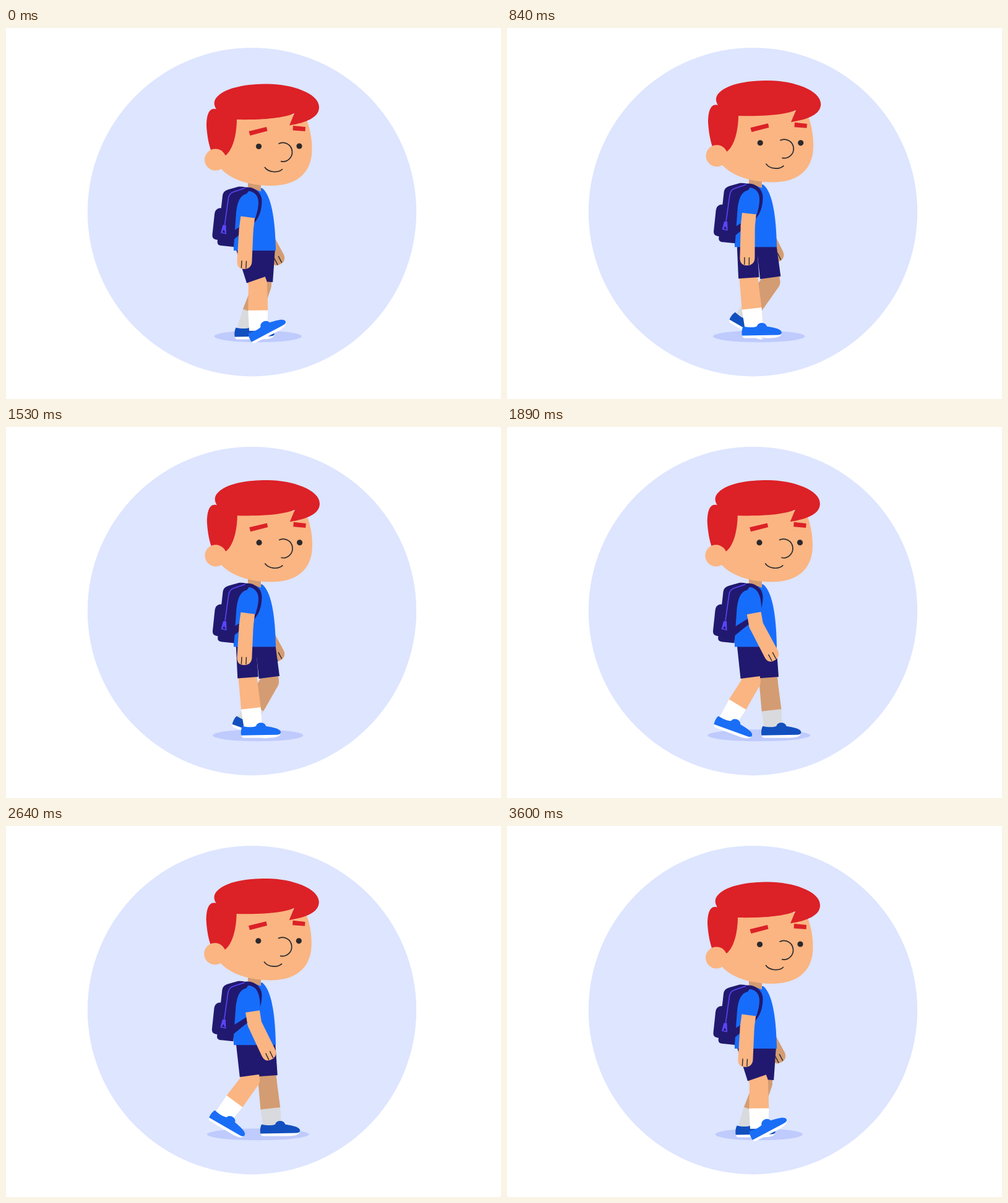
An HTML page for the animation above (3.63 s loop, 800 by 600 pixels).

```html
<!DOCTYPE html>
<html lang="en">
<head>
<meta charset="utf-8">
<title>Walking boy</title>
<style>
html, body { margin: 0; width: 100%; height: 100%; overflow: hidden; background: #fff; }
svg { display: block; width: 800px; height: 600px; }
</style>
</head>
<body>
<svg id="stage" viewBox="0 0 800 600" xmlns="http://www.w3.org/2000/svg"></svg>
<script>
const SKIN = '#fab582', SHADE = '#d49c72', HAIR = '#dc2127', SHIRT = '#176dfb';
const NAVY = '#21196f', ZIP = '#5b46fb', INK = '#2b292d';
const LOOP = 3630, STEP = 30, CYCLE = 720;
const THIGH = 62, SHIN = 73, UPPER = 47;

const leg = (id, skin, sock, shoe, cuff) => `
  <g id="${id}">
    <rect x="-15" y="20" width="30" height="43" fill="${skin}"/>
    <g id="${id}Shin">
      <circle r="15" fill="${skin}"/>
      <path d="M-15 0H15L16 ${cuff + 1}H-16Z" fill="${skin}"/>
      <path d="M-16 ${cuff}H16L14.500 76H-14.500Z" fill="${sock}"/>
      <g id="${id}Foot">
        <path d="M-19 11L45 9C45 17 35 18 20 18H-14C-18 18-19 16-19 11Z" fill="#fff"/>
        <path d="M-17-1C-8 1 0 1 5-1C6-8 19-9 21-1C32 1 45 3 45 9C45 12 42 13 37 13L-19 14C-20 8-19 2-17-1Z" fill="${shoe}"/>
      </g>
    </g>
    <path d="M-15-5H17V55H-16.500Z" fill="${NAVY}"/>
  </g>`;

const arm = (id, skin, sleeve) => `
  <g id="${id}">
    <rect x="-11.500" y="15" width="23" height="32" fill="${skin}"/>
    <g id="${id}Fore">
      <circle r="11.500" fill="${skin}"/>
      <path d="M-11.500 0L-12 52C-12 60-8 64-2 64C5 65 12 61 12 52L11.500 0Z" fill="${skin}"/>
      <path d="M-4.500 51V63M3 51V63" stroke="${INK}" stroke-width="1.400"/>
    </g>
    <path d="M-12.500 27C-14 5-14-11 1-11C14-11 17 2 12.500 27Z" fill="${sleeve}"/>
  </g>`;

const head = `
  <g id="head">
    <path d="M340 140H482C491 158 494.500 178 494.500 196C494.500 236 468 255 428 255C395 255 363 246 346 226Z" fill="${SKIN}"/>
    <path d="M342 132C328 126 324 141 324 158C325 175 328 190 332 200L355 206C367 196 373 172 373 146Z" fill="${HAIR}"/>
    <path d="M341 133C336 126 334 118 342 110.500C357 95.500 390 90.500 423 90.500C460 90.500 506 105 506 128C506 145 485 153 458 157.500L466 138C452 144 426 149 372 148Z" fill="${HAIR}"/>
    <circle cx="338.500" cy="213" r="17.500" fill="${SKIN}"/>
    <path d="M392.500 167L421 160L422.500 166.500L394.500 174ZM464 158L484 160L483.500 167L463.500 165.500Z" fill="${HAIR}"/>
    <circle cx="408.500" cy="191.500" r="4.600" fill="${INK}"/>
    <circle cx="474" cy="191" r="4.600" fill="${INK}"/>
    <path d="M440.500 187.200A15.200 15.200 0 1 1 444 215.600M418 225C424 234 440 235 447 228"
      fill="none" stroke="${INK}" stroke-width="1.700"/>
  </g>`;

const pack = `
  <g id="pack">
    <path d="M350 271C351 265 354 263 360 261L376 256.500Q388 256 394 261L389 268C379 270 374 280 372 298L368 354L349 352C342 352 341 348 342 343Z" fill="${NAVY}"/>
    <path d="M350 291C341 291 338 294 337 301L333.500 334C333 340 336 342 343 343H350Z" fill="${NAVY}"/>
    <path d="M386 259L368 265Q361 267 359.500 275L353.500 318" fill="none" stroke="${ZIP}" stroke-width="1.600"/>
    <path d="M350.500 318.500H355.500L356 333.500L347 331.500Z" fill="${ZIP}"/>
    <path d="M352 326L354.500 331.500L349.500 330.500Z" fill="${NAVY}"/>
  </g>`;

const stage = document.getElementById('stage');
stage.innerHTML = `
  <circle cx="397.500" cy="297.700" r="265.700" fill="#dde5ff"/>
  <ellipse id="shadow" cx="407.200" cy="498.700" ry="9.500" fill="#bfcafd"/>
  <g id="body">
    ${arm('farArm', SHADE, SHIRT)}
    ${leg('farLeg', SHADE, '#d8dadd', '#1250bf', 46)}
    ${leg('nearLeg', SKIN, '#fff', '#1a6ef6', 43)}
    <path d="M373 350H431V372H375Z" fill="${NAVY}"/>
    <path d="M386 258L414 259C428 270 435 305 436 360H368C367 320 370 285 377 268Z" fill="${SHIRT}"/>
    <path d="M391 245H412V264.500L391 257Z" fill="${SHADE}"/>
    <path d="M384 261C400 258 411 268 410.500 281C410 300 402 314 388 322L366 336" fill="none" stroke="${NAVY}" stroke-width="6"/>
    <path d="M366 329L390 314V324L368 342Z" fill="${NAVY}"/>
    ${pack}
    ${arm('nearArm', SKIN, SHIRT)}
    ${head}
  </g>`;

const part = {};
stage.querySelectorAll('[id]').forEach(e => part[e.id] = e);

// Smooth periodic curve through [time, value] keys, without overshoot.
function curve(keys, period) {
  const n = keys.length;
  const at = i => {
    const k = keys[(i + n) % n];
    return [k[0] + Math.floor(i / n) * period, k[1]];
  };
  const rise = i => {
    const [a, b] = [at(i), at(i + 1)];
    return (b[1] - a[1]) / (b[0] - a[0]);
  };
  const slope = i => {
    const p = rise(i - 1), q = rise(i);
    return p * q <= 0 ? 0 : 2 * p * q / (p + q);
  };
  return time => {
    const t = ((time % period) + period) % period;
    let i = n - 1;
    while (keys[i][0] > t) i--;
    const [t0, v0] = at(i), [t1, v1] = at(i + 1);
    const d = t1 - t0, u = (t - t0) / d, w = 1 - u;
    return v0 * w * w * (1 + 2 * u) + v1 * u * u * (3 - 2 * u)
      + d * u * w * (w * slope(i) - u * slope(i + 1));
  };
}

const thigh = curve([[0, 19], [90, 4.2], [120, 4], [360, -4], [450, 7.5], [480, 7.8], [600, 22], [660, 25]], CYCLE);
const shin = curve([[0, -0.5], [90, -6.2], [120, -6.2], [360, 20], [450, 31], [480, 36.5], [560, 46], [640, 22]], CYCLE);
const foot = curve([[0, -27], [80, 0], [360, 0], [450, 21], [480, 31], [560, 40], [650, -5]], CYCLE);
const bob = curve([[0, 0], [90, -4.6], [120, -5.8], [180, -7.8], [270, -4]], CYCLE / 2);
const spread = curve([[0, 70.5], [90, 73], [360, 84], [480, 82.3]], CYCLE);

function place(id, x, y, angle = 0, px = 0, py = 0) {
  part[id].setAttribute('transform',
    `translate(${x.toFixed(2)} ${y.toFixed(2)}) rotate(${angle.toFixed(2)} ${px} ${py})`);
}

function poseLeg(id, x, t) {
  const a = thigh(t), b = shin(t);
  place(id, x, 355, -a);
  place(id + 'Shin', 0, THIGH, a + b);
  place(id + 'Foot', 0, SHIN, foot(t) - b);
}

function poseArm(id, x, t) {
  const swing = Math.cos((t - 45) / CYCLE * 2 * Math.PI);
  const a = 1.4 - 9.6 * swing, b = 12.4 - 16.7 * swing;
  place(id, x, 279, -a);
  place(id + 'Fore', 0, UPPER, a - b);
}

function draw(t) {
  const sway = Math.sin(t / CYCLE * 2 * Math.PI);
  const lift = bob(t);
  part.shadow.setAttribute('rx', spread(t).toFixed(2));
  place('body', 0, lift);
  place('head', sway * 0.8 + lift * 0.08, 0, -lift * 0.08, 400, 250);
  place('pack', sway * 0.7, 0);
  poseLeg('nearLeg', 386.7, t);
  poseLeg('farLeg', 418, t + CYCLE / 2);
  poseArm('nearArm', 394.3, t);
  poseArm('farArm', 405.3, t + CYCLE / 2);
}

const start = performance.now();
function tick() {
  const t = (performance.now() - start) % LOOP;
  draw(Math.floor(t / STEP) * STEP % CYCLE);
  requestAnimationFrame(tick);
}
tick();
</script>
</body>
</html>
```
